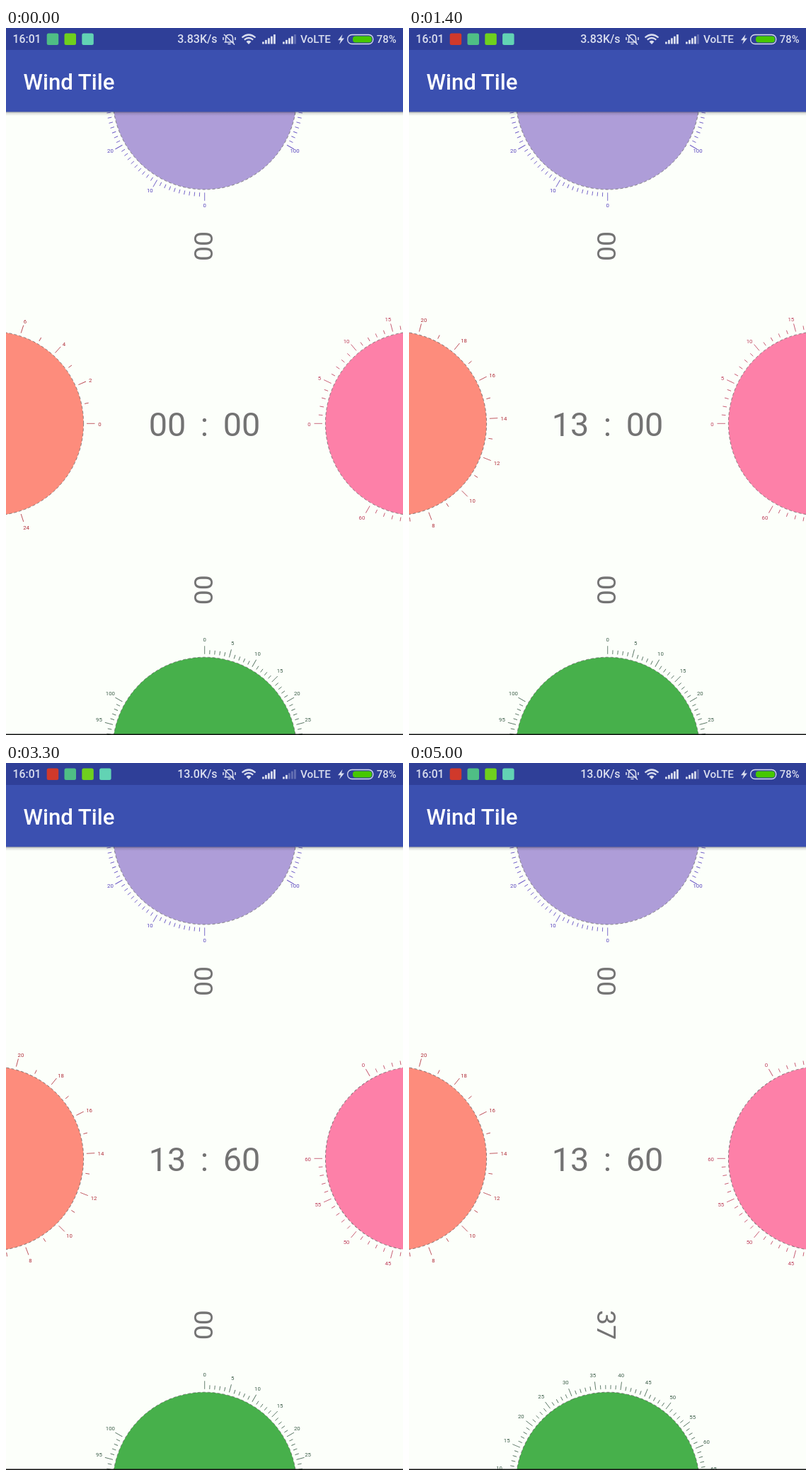
Recreate the animation shown at these times as an HTML page. Size 561x998 px, loop 5.1 s.

```html
<!DOCTYPE html>
<html lang="en">
<head>
<meta charset="utf-8">
<title>Dials</title>
<style>
html, body { margin: 0; width: 100%; height: 100%; overflow: hidden; background: #fcfffa; }
svg { display: block; width: 561px; height: 998px; font-family: Roboto, sans-serif; }
.status { fill: #d9ddee; font-size: 15.8px; font-weight: 500; }
.title { fill: #fff; font-size: 31.2px; font-weight: 500; }
.big { fill: #737373; font-size: 46.75px; text-anchor: middle; }
.side { fill: #737373; font-size: 37.4px; text-anchor: middle; }
.label { font-size: 7.8px; text-anchor: middle; }
</style>
</head>
<body>
<svg id="stage" viewBox="0 0 561 998">
  <defs>
    <linearGradient id="shade" x2="0" y2="1">
      <stop offset="0" stop-color="#000" stop-opacity=".36"/>
      <stop offset=".4" stop-color="#000" stop-opacity=".12"/>
      <stop offset="1" stop-color="#000" stop-opacity="0"/>
    </linearGradient>
  </defs>
  <rect width="561" height="998" fill="#fcfffa"/>
  <g id="dials"></g>

  <text id="hours" class="big" x="228" y="576.4">00</text>
  <text class="big" x="280.5" y="576.4">:</text>
  <text id="minutes" class="big" x="333" y="576.4">00</text>
  <text class="side" transform="translate(265.8 308) rotate(90)">00</text>
  <text id="bottomValue" class="side" transform="translate(265.8 793.2) rotate(90)">00</text>

  <rect y="118" width="561" height="6" fill="url(#shade)"/>
  <rect y="31" width="561" height="87.4" fill="#3b50b0"/>
  <rect width="561" height="31" fill="#2f3f98"/>
  <rect y="996.5" width="561" height="1.5" fill="#111"/>
  <text class="title" x="24.5" y="87">Wind Tile</text>

  <g class="status">
    <text x="9.5" y="21.3">16:01</text>
    <text id="speed" x="298.6" y="21.3" text-anchor="end" style="font-size:16px">3.83K/s</text>
    <text x="416" y="21.3" style="font-size:15.3px">VoLTE</text>
    <text x="551.5" y="21.3" text-anchor="end" style="font-size:14.8px">78%</text>
    <path d="M475.500 9 L469 17.200 H473 L471 23 L478 14.500 H474 Z"/>
    <g fill="none" stroke="#d9ddee" stroke-width="1.6">
      <path d="M308.500 20 H322 M310.500 19.500 V14 Q311 9.500 315.500 9.500 Q320 9.500 320.500 14 V19.500 M313.500 22.500 H317.500 M308 9 L323 23.500 M307 17 V13 M324 17 V13"/>
      <path d="M333.500 13.500 Q343 5.500 352.500 13.500 M336.800 16.700 Q343 11.300 349.200 16.700" stroke-width="2.2"/>
      <rect x="482.700" y="9.500" width="36" height="13" rx="6" stroke-width="1.3"/>
    </g>
    <path d="M339.500 19.200 Q343 16.500 346.500 19.200 L343 23 Z"/>
    <rect x="490" y="11.500" width="27" height="9" rx="4" fill="#46c800"/>
  </g>
  <g id="apps"></g>
  <g id="signals" fill="#d9ddee"></g>
</svg>
<script>
const LOOP = 5100, STEP = 100;
const RADIUS = 129.9, LABEL_RADIUS = 152.8;
const $ = id => document.getElementById(id);

function add(parent, tag, attrs, text) {
  const el = document.createElementNS("http://www.w3.org/2000/svg", tag);
  for (const key in attrs) el.setAttribute(key, attrs[key]);
  if (text !== undefined) el.textContent = text;
  parent.appendChild(el);
  return el;
}

// shift: label offset by digit count; keys: [time, value] pairs
const specs = [
  { x: 280.7, y: 98.1, base: 90, step: 3, max: 100, major: 10,
    fill: "#ae9dd8", ink: "#5540bd", shift: [0, -1, -5], dy: -.8, keys: [[0, 0]] },
  { x: -20.3, y: 558.3, base: 0, step: -12, max: 24, major: 2,
    fill: "#fd8c7c", ink: "#b02c38", shift: [0, 1.7], dy: 1.2,
    keys: [[0, 0], [100, .3], [300, 4.5], [600, 11.09], [800, 12.9], [1100, 13.6], [1400, 13.75]] },
  { x: 581.3, y: 558.3, base: 180, step: 5, max: 60, major: 5,
    fill: "#fd80a8", ink: "#bd3b58", shift: [0, -2], dy: .6,
    keys: [[1700, 0], [2100, 16.58], [2600, 40], [3000, 56], [3200, 60]] },
  { x: 280.7, y: 1018.1, base: -90, step: 3, max: 100, major: 5,
    fill: "#47b04b", ink: "#3c5d49", shift: [0, -1.7, -1], dy: -2.6,
    keys: [[3500, 0], [3600, 1], [3900, 15], [4200, 28.1], [4500, 34], [4800, 36.8], [5000, 37.4]] }
];

function buildDial(spec) {
  const root = add($("dials"), "g", { transform: `translate(${spec.x} ${spec.y})` });
  add(root, "circle", { r: RADIUS, fill: spec.fill });
  const wheel = add(root, "g", { stroke: spec.ink, fill: "none", "stroke-width": .9 });
  add(wheel, "circle", { r: RADIUS, stroke: "#555", "stroke-opacity": .75, "stroke-dasharray": "4 3" });
  const labels = [];
  for (let n = 0; n <= spec.max; n++) {
    const isMajor = n % spec.major === 0;
    add(wheel, "line", {
      x1: 134.3, x2: isMajor ? 145.8 : 140,
      transform: `rotate(${spec.base + n * spec.step})`, "stroke-opacity": .85
    });
    if (isMajor) labels.push({ n, el: add(root, "text", { class: "label", fill: spec.ink }, n) });
  }
  return { spec, wheel, labels };
}

function valueAt(keys, t) {
  if (t <= keys[0][0]) return keys[0][1];
  for (let i = 1; i < keys.length; i++) {
    const [t0, v0] = keys[i - 1], [t1, v1] = keys[i];
    if (t <= t1) return v0 + (v1 - v0) * (t - t0) / (t1 - t0);
  }
  return keys[keys.length - 1][1];
}

function turnDial({ spec, wheel, labels }, t) {
  const value = valueAt(spec.keys, t);
  wheel.setAttribute("transform", `rotate(${-value * spec.step})`);
  for (const { n, el } of labels) {
    const a = (spec.base + (n - value) * spec.step) * Math.PI / 180;
    el.setAttribute("x", LABEL_RADIUS * Math.cos(a) + spec.shift[String(n).length - 1]);
    el.setAttribute("y", LABEL_RADIUS * Math.sin(a) + spec.dy + 2.8);
  }
}

const twoDigits = v => String(Math.floor(v + 1e-6)).padStart(2, "0");
const dials = specs.map(buildDial);

const apps = ["#d0392b", "#4fbe85", "#6fd01e", "#62d3b4"].map(fill =>
  add($("apps"), "rect", { y: 7.5, width: 16.5, height: 16.5, rx: 2.5, fill }));

const buildBars = x => [0, 1, 2, 3, 4].map(i =>
  add($("signals"), "rect", { x: x + i * 4, y: 19.5 - i * 2.6, width: 2.8, height: 3 + i * 2.6 }));
buildBars(362);
const weakBars = buildBars(391);

function draw(t) {
  dials.forEach(dial => turnDial(dial, t));
  $("hours").textContent = twoDigits(valueAt(specs[1].keys, t));
  $("minutes").textContent = twoDigits(valueAt(specs[2].keys, t));
  // the bottom readout trails its wheel slightly
  $("bottomValue").textContent = twoDigits(valueAt(specs[3].keys, t - 60));
  $("speed").textContent = t < 2800 ? "3.83K/s" : "13.0K/s";

  const recording = t >= 200;
  apps.forEach((el, i) => {
    el.setAttribute("x", 57.7 + 24.8 * (recording ? i : i - 1));
    el.setAttribute("visibility", i || recording ? "visible" : "hidden");
  });
  const level = t >= 1900 && t < 4800 ? 2 : 4;
  weakBars.forEach((el, i) => el.setAttribute("opacity", i < level ? 1 : .3));
}

let shown = -1;
function tick() {
  const t = Math.floor(performance.now() % LOOP / STEP) * STEP;
  if (t !== shown) draw(shown = t);
  requestAnimationFrame(tick);
}
tick();
</script>
</body>
</html>
```
